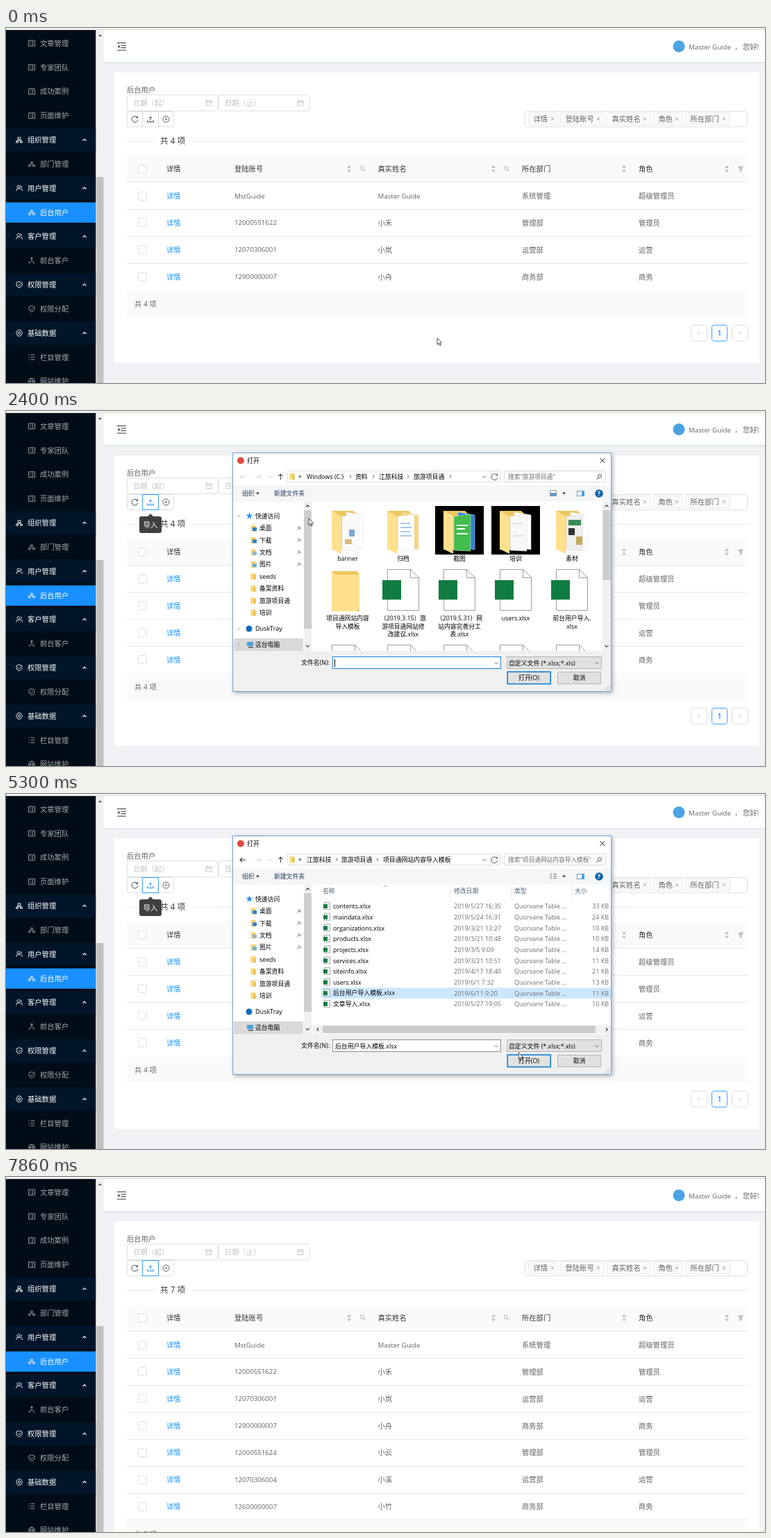
An HTML page that plays this animation: 1093 px wide and 512 px high, repeating every 7.95 s.

```html
<!DOCTYPE html>
<html lang="zh-CN">
<head>
<meta charset="utf-8">
<title>后台用户</title>
<style>
html,body{margin:0;width:100%;height:100%;overflow:hidden}
svg{display:block;width:100%;height:100%;font-family:"Open Sans","Noto Sans CJK SC","Noto Sans CJK",sans-serif}
text{white-space:pre}
</style>
</head>
<body>
<svg id="stage" viewBox="0 0 1093 512"></svg>
<script>
const LOOP = 7950, BLUE = '#1890ff', GREEN = '#107c41', GREY = '#d9d9d9', SOFT = '#bfbfbf', DARK = '#333', BODY = '#626262';

// Drawing helpers; text is placed by its vertical centre.
const T = (x, y, s, size = 10.3, fill = BODY, extra = '') =>
  `<text x="${x}" y="${y + size * .37}" font-size="${size}" fill="${fill}" ${extra}>${s}</text>`;
const R = (x, y, w, h, fill, extra = '') =>
  `<rect x="${x}" y="${y}" width="${w}" height="${h}" fill="${fill}" ${extra}/>`;
const box = (x, y, w, h, stroke = GREY, fill = '#fff', r = 0) =>
  R(x + .5, y + .5, w - 1, h - 1, fill, `stroke="${stroke}" stroke-width=".85" rx="${r}"`);
const P = (d, stroke, width = 1, fill = 'none') =>
  `<path d="${d}" stroke="${stroke}" stroke-width="${width}" fill="${fill}"/>`;
const at = (x, y, s, id = '') => `<g ${id && `id="${id}"`} transform="translate(${x} ${y})">${s}</g>`;
const G = (id, s) => `<g id="${id}">${s}</g>`;
const icon = (x, y, d, color, width = .9) => at(x, y, P(d, color, width));
const dot = (x, y, r, fill, extra = '') => `<circle cx="${x}" cy="${y}" r="${r}" fill="${fill}" ${extra}/>`;
const MID = 'text-anchor="middle"', END = 'text-anchor="end"';

const ring = r => `M${-r} 0a${r} ${r} 0 1 1 ${2 * r} 0a${r} ${r} 0 1 1 ${-2 * r} 0z`;
const ICON = {
  page: 'M-4.5-4h9v8h-9zM-2.5-2h1M0-2h2.5M-2.5 0h1M0 0h2.5M-2.5 2h1M0 2h2.5',
  org: 'M-2-3.5h4v3h-4zM-4.5 2h3v2h-3zM1.5 2h3v2h-3zM0-.5V1M-3 2V.8H3V2',
  tree: 'M-1.3-3h2.6v2.5h-2.6zM-4.3 1h2.6v2.5h-2.6zM1.7 1h2.6v2.5h-2.6zM0-.5V1',
  user: 'M-1-4a2 2 0 1 1-.1 0zM-4.5 4Q-4 .3-1 .2Q1 .2 2 2M2-4Q4.5-2 2.4 0Q4.4 1 4.5 4',
  nodes: 'M0-4v3M0 0L-3.5 3M0 0L3.5 3M-1.3-3a1.3 1.3 0 1 1 2.6 0zM-4.5 3.5h2.4M2.1 3.5h2.4M-1 0h2',
  shield: 'M0-4.5L4-3V.5Q3.5 3 0 4.5Q-3.5 3-4 .5V-3zM-2 0L-.5 1.5 2-1.5',
  gear: 'M-2-4.2h4L4.5 0 2 4.2h-4L-4.5 0z' + ring(1.6),
  list: 'M-1.5-3.5h6M-1.5 0h6M-1.5 3.5h6M-4.5-3.5h1.2M-4.5 0h1.2M-4.5 3.5h1.2',
  globe: ring(4.5) + 'M-4.5 0h9M0-4.5Q-4 0 0 4.5Q4 0 0-4.5',
  reload: 'M3.6-2.4A4.4 4.4 0 1 0 4.3 1M4-4.5v2.4H1.6',
  upload: 'M0 2V-3.5M-2-1.6L0-3.6 2-1.6M-4.3 1.5V4h8.6V1.5',
  cancel: ring(4.5) + 'M-1.6-1.6L1.6 1.6M1.6-1.6L-1.6 1.6',
  date: 'M-4-3h8v7h-8zM-4-.6h8M-2-4.4v2M2-4.4v2',
  search: 'M1 1L4 4M-3.5-1a2.5 2.5 0 1 1 5 0a2.5 2.5 0 1 1-5 0z',
  cross: 'M-2.3-2.3L2.3 2.3M2.3-2.3L-2.3 2.3',
  up: 'M-2.5 1.3L0-1.2 2.5 1.3', down: 'M-2.5-1.2L0 1.3 2.5-1.2',
  left: 'M1.2-2.2L-1.2 0 1.2 2.2', right: 'M-1.2-2.2L1.2 0-1.2 2.2',
  back: 'M4 0H-4M-.8-3L-4 0-.8 3', next: 'M-4 0H4M.8-3L4 0 .8 3', rise: 'M0 4V-4M-3-.8L0-4 3-.8'
};

function sidebar() {
  const items = [['page', '文章管理'], ['page', '专家团队'], ['page', '成功案例'], ['page', '页面维护'],
    ['org', '组织管理', 1], ['tree', '部门管理'], ['user', '用户管理', 1], ['tree', '后台用户'],
    ['user', '客户管理', 1], ['nodes', '前台客户'], ['shield', '权限管理', 1], ['shield', '权限分配'],
    ['gear', '基础数据', 1], ['list', '栏目管理'], ['globe', '网站维护']];
  return R(0, 3, 129.5, 509, '#000c17') + items.map(([name, label, parent], i) => {
    const y = 22 + i * 34.83, active = i === 7, color = parent || active ? '#fff' : '#a6a9ad';
    return (parent ? R(0, y - 17, 129.5, 34, '#001529') + icon(113, y, ICON.up, '#fff', 1.2) : '') +
      (active ? R(0, y - 14.3, 129.5, 29.3, BLUE) : '') +
      icon(parent ? 19 : 37, y, ICON[name], color) + T(parent ? 31 : 49, y, label, 10.3, color);
  }).join('') + R(129.5, 3, 11.5, 509, '#f1f1f1') + R(130.5, 215, 10, 297, '#c1c1c1') +
    P('M133 12l2.5-3 2.5 3z', 'none', 0, '#505050');
}

function page() {
  const tags = [[752, 44, '详情'], [798, 64, '登陆账号'], [865, 64, '真实姓名'], [932, 43, '角色'], [978, 65, '所在部门']];
  const dates = [[174, '日期（起）'], [306, '日期（止）']];
  return R(0, 0, 1093, 512, '#f0f2f5') + R(0, 0, 1093, 3, '#fff') + R(0, 1.5, 1093, 1.2, '#cfd5d3') + sidebar() +
    R(141, 3, 952, 46, '#fff') + R(141, 49, 952, 1, '#dde1e6') + R(141, 50, 952, 2, '#e8ebef') +
    P('M160 21.5h13M165.5 25h7.5M165.5 28.5h7.5M160 32h13', DARK, 1.1) + P('M163.5 24.5v4.5l-3-2.2z', 'none', 0, DARK) +
    dot(969, 26.5, 8.5, '#4ba3e3') + T(983, 27, 'Master Guide', 9.7) + T(1049, 27, '，') + T(1061, 27, '您好!') +
    R(156, 64, 929, 419, '#fff', 'id="card"') + T(174, 89, '后台用户') +
    dates.map(([x, s]) => box(x, 96, 131.5, 24, GREY, '#fff', 3) + T(x + 9, 108.5, s, 10.3, SOFT) + icon(x + 118, 108, ICON.date, SOFT)).join('') +
    box(174, 120, 68, 23, GREY, '#fff', 3) + P('M196.5 120v23M219.5 120v23', GREY) +
    G('reload', icon(185.5, 131.5, ICON.reload, '#444', 1)) +
    G('busy', R(174.5, 120.5, 22, 22, '#f5f5f5') + at(185.5, 131.5, P('M0-4.5A4.5 4.5 0 0 1 4.5 0', SOFT), 'arc')) +
    G('idle', icon(208, 131.5, ICON.upload, '#444', 1)) +
    G('hot', box(196, 120, 24, 23, BLUE) + icon(208, 131.5, ICON.upload, BLUE, 1)) +
    icon(230.5, 131.5, ICON.cancel, '#444') + box(747, 120, 321, 23, GREY, '#fff', 3) +
    tags.map(([x, w, s]) => box(x, 122, w, 18, '#e8e8e8', '#fafafa', 2) + T(x + 7.5, 131.5, s) + icon(x + w - 9, 131, ICON.cross, '#999', .8)).join('') +
    P('M174 163.5h41M267 163.5h801', '#e8e8e8');
}

function table(count) {
  const heads = [[231, '详情'], [329, '登陆账号'], [535.5, '真实姓名'], [743, '所在部门'], [911, '角色']];
  const people = [['MstGuide', 'Master Guide', '系统管理', '超级管理员'], ['12000551622', '小禾', '管理部', '管理员'],
    ['12070306001', '小岚', '运营部', '运营'], ['12900000007', '小舟', '商务部', '商务'], ['12000551624', '小云', '管理部', '管理员'],
    ['12070306004', '小溪', '运营部', '运营'], ['12600000007', '小竹', '商务部', '商务']];
  const check = y => box(190, Math.round(y - 6.5), 13, 13, GREY, '#fff', 2), total = `共 ${count} 项`;
  const end = Math.round(222.5 + count * 38.9);
  const rows = people.slice(0, count).map((cells, i) => {
    const y = 242 + i * 38.9;
    return check(y) + T(231, y, '详情', 10.3, BLUE) +
      cells.map((s, k) => T(heads[k + 1][0], y, s, /^\w/.test(s) ? 9.7 : 10.3)).join('') + R(174, Math.round(y + 19), 894, 1, '#e8e8e8');
  }).join('');
  const pager = [[986, ICON.left], [1045, ICON.right]].map(([x, d]) =>
    box(x, end + 50, 24, 24, GREY, '#fff', 3) + icon(x + 12, end + 62, d, SOFT)).join('') +
    box(1016, end + 50, 23, 24, BLUE, '#fff', 3) + T(1027.5, end + 62, '1', 10.3, BLUE, MID + ' font-weight="600"');
  return G('total' + count, T(222, 163, total, 11.7, DARK)) + G('table' + count, R(174, 184, 894, 38, '#fafafa') +
    R(174, 222, 894, 1, '#e8e8e8') + check(203) + heads.map(([x, s]) => T(x, 203, s, 10.3, DARK)).join('') +
    [494, 702, 890, 1038].map(x => P(`M${x - 3} 202l3-4 3 4zM${x - 3} 204.5l3 4 3-4z`, 'none', 0, SOFT)).join('') +
    [514, 721].map(x => icon(x, 203, ICON.search, '#aaa')).join('') + P('M1054 199.5h8l-2.5 4.5v3.5h-3v-3.5z', 'none', 0, SOFT) +
    rows + R(174, end, 894, 39, '#fafafa') + T(185, end + 20, total) + pager);
}

const miniFolder = (x, y) => R(x - 3.5, y - 4.5, 7, 9, '#f8d775') + R(x + 1, y - 2, 2.5, 6.5, '#e6b94d');
const plainFolder = (x, y) => at(x, y, P('M-22 3h35l4 4v54h-39z', 'none', 0, '#edc65e') + P('M-23 3l6 5h34v50l-5 3h-35z', 'none', 0, '#ffe08f'));
function folder(x, y, back, front, marks = '', backdrop) {
  return at(x, y, (backdrop ? R(-35, 0, 70, 70, backdrop) : '') + P('M-23 7h31l4 4v52h-35z', 'none', 0, '#edc65e') +
    P('M-2 9l24 4v50l-24-4z', '#ddd', .5, back) + P('M-8 15l24-3v53l-24-1z', '#ddd', .5, front) + marks +
    P('M-23 7l14 8v54l-14-7z', 'none', 0, '#ffe08f'));
}
const sheet = (x, y) => at(x, y, P('M-22.5.5h33l12 12v47h-45z', '#8c8c8c', .85, '#fff') + P('M10.5.5v12h12', '#8c8c8c', .85) + R(-30, 16, 27, 28, GREEN));

function grid() {
  const xs = [492, 572, 653, 734, 815];
  const label = (x, y, s) => s.split('/').map((line, i) => T(x, y + i * 11.6, line, 8.8, '#000', MID)).join('');
  const top = ['banner', '归档', '截图', '培训', '素材'];
  const second = ['项目通网站内容/导入模板', '（2019.3.15）旅/游项目通网站修/改建议.xlsx', '（2019.5.31）网/站内容完善分工/表.xlsx', 'users.xlsx', '前台用户导入./xlsx'];
  const third = ['网站各栏目标/题、关键词及描/述.xlsx', '项目通功能列表/及完成情况(修/改）.xlsx', '项目通功能列表/及完成情况.xlsx', '项目通前端页面./xlsx', '项目推进时间表./xlsx'];
  const lines = c => P('M-4 25h14M-4 31h16M-4 37h14M-4 43h16', c, 1);
  return folder(492, 137, '#fff', '#fafafa', R(2, 34, 8, 10, '#7fa6d8') + R(-4, 48, 10, 7, '#d9ba78')) +
    folder(572, 137, '#f6d678', '#fff', lines('#4a90d9')) +
    folder(653, 137, '#2f80d8', '#43bd4c', P('M-4 28h16M-4 33h12M-4 40h16', '#fff', 2), '#000') +
    folder(734, 137, '#fff', '#f8f8f8', P('M-4 25h14M-4 43h16', '#ccc'), '#000') +
    folder(815, 137, '#fff', '#eee', R(-5, 20, 18, 8, '#3a8a55') + R(-5, 32, 9, 10, '#333') + R(6, 44, 9, 12, '#c5a760')) +
    top.map((s, i) => label(xs[i], 213, s)).join('') +
    G('picked', box(454, 222, 76, 97, '#99d1ff', '#cce8ff')) + G('closed', plainFolder(492, 228)) +
    G('filled', folder(492, 228, '#fff', '#fff', R(-6, 28, 9, 16, GREEN) + R(7, 28, 5, 16, GREEN))) +
    second.map((s, i) => (i ? sheet(xs[i], 228) : '') + label(xs[i], 299, s)).join('') +
    third.map((s, i) => sheet(xs[i], 337) + label(xs[i], 408, s)).join('');
}

const ROW = 15.65, LIST_TOP = 154.2;
function list() {
  const files = [['contents', '5/27 16:35', 33], ['maindata', '5/24 16:31', 24], ['organizations', '3/21 13:27', 10],
    ['products', '3/21 10:48', 10], ['projects', '3/5 9:09', 14], ['services', '3/21 10:51', 11], ['siteinfo', '4/17 18:40', 21],
    ['users', '6/1 7:32', 13], ['后台用户导入模板', '6/11 9:20', 11], ['文章导入', '5/27 19:05', 10]];
  const ys = files.map((_, i) => 162 + i * ROW), soft = '#6d6d6d';
  return R(442, 131, 429, 215, '#fff') + [[456, '名称'], [645, '修改日期'], [732, '类型'], [819, '大小']].map(([x, s]) => T(x, 140, s, 8.8, '#4c607a')).join('') +
    P('M640.5 131v19M728.5 131v19M815.5 131v19', '#e5e5e5') + icon(546, 133, ICON.up, '#888', .8) +
    R(454, 0, 417, ROW, '#e5f3ff', 'id="hover"') + R(454, LIST_TOP + 8 * ROW, 417, ROW, '#cce8ff', 'id="chosen"') +
    G('icons', ys.map(y => box(458, y - 6, 9, 11, '#999') + R(457, y - 3, 6, 6, GREEN)).join('')) +
    files.map(([name, date, size], i) => T(471, ys[i], name + '.xlsx', 8.9, '#000') + T(645, ys[i], '2019/' + date, 9, soft) +
      T(732, ys[i], 'Quorvane Table ...', 9, soft) + T(868, ys[i], size + ' KB', 9, soft, END)).join('') +
    R(443, 334, 428, 11, '#f0f0f0') + R(456, 334, 393, 11, '#cdcdcd') +
    icon(449, 339.5, ICON.left, DARK, 1.1) + icon(865, 339.5, ICON.right, DARK, 1.1);
}

function dialog() {
  const crumbs = (parts, seps, query) => parts.map(([x, s]) => T(x, 94.5, s, 8.9, '#000')).join('') +
    seps.map(x => icon(x, 94.5, ICON.right, '#444')).join('') + T(723, 95, `搜索"${query}"`, 8.7, '#6d6d6d');
  const places = ['桌面', '下载', '文档', '图片', 'seeds', '备案资料', '旅游项目通', '培训'];
  const vbar = (x, w) => R(x, 131, w, 215, '#f0f0f0') + icon(x + w / 2, 137, ICON.up, DARK, 1.1) + icon(x + w / 2, 339, ICON.down, DARK, 1.1);
  return R(326.5, 60.5, 545, 344, '#fff', 'style="filter:drop-shadow(2px 2px 3px #0005)"') +
    dot(338, 71.5, 5, '#e04a3f') + T(347, 71.5, '打开', 9, '#000') + icon(859, 71.5, 'M-3.5-3.5L3.5 3.5M3.5-3.5L-3.5 3.5', '#000') +
    G('backOff', icon(341, 95, ICON.back, '#ccc')) + G('backOn', icon(341, 95, ICON.back, '#333', 1.1)) +
    icon(363, 95, ICON.next, '#ccc') + icon(380, 95, ICON.down, '#bbb') + icon(395.5, 95, ICON.rise, '#444', 1.1) +
    box(405, 86, 307, 17, GREY) + miniFolder(412, 94.5) + T(421, 93.5, '«', 9, '#000') +
    G('pathOut', crumbs([[433, 'Windows (C:)'], [503, '资料'], [537, '江旅科技'], [587, '旅游项目通']], [496, 529, 579, 640], '旅游项目通')) +
    G('pathIn', crumbs([[433, '江旅科技'], [483, '旅游项目通'], [543, '项目通网站内容导入模板']], [476, 535], '项目通网站内容导入模板')) +
    icon(689, 95, ICON.down, '#555') + R(697, 87, 1, 15, '#ddd') + icon(703.5, 95, ICON.reload, '#555', 1) +
    P('M717.5 86.5h146v16h-146z', GREY) + at(854, 95, `<g transform="scale(-1 1)">${P(ICON.search, '#555', 1)}</g>`) +
    R(327, 107, 544, 24, '#f5f6f7') + T(340, 119, '组织', 8.8, '#1e395b') + T(386, 119, '新建文件夹', 8.8, '#1e395b') +
    P('M360 117.5h5l-2.5 3zM801 117.5h5l-2.5 3z', 'none', 0, DARK) +
    G('viewIcons', box(783, 114, 10, 9, '#888') + R(784, 118, 8, 4, '#5b9bd5')) +
    G('viewList', P('M783 115.5h3M783 118.5h3M783 121.5h3M788 115.5h5M788 118.5h5M788 121.5h5', '#777')) +
    box(822, 115, 11, 8, '#5a8fc4') + R(829, 115, 4, 8, '#4aa0e8') + dot(854, 119, 5.8, '#0a64ad') + T(854, 119, '?', 9, '#fff', MID + ' font-weight="700"') +
    R(327, 131, 102, 215, '#fff') + R(328, 328, 100, 18, '#d9d9d9') +
    T(345, 151, '★', 11, '#2f8fe0') + T(359, 151.5, '快速访问', 8.8, '#000') +
    places.map((s, i) => {
      const y = 169 + i * 17.4;
      return miniFolder(356, y) + (i < 4 ? R(355, y - 1, 6, 5, ['#2684d8', '#2684d8', '#8fb4d6', '#62b5d8'][i]) +
        at(422, y, P('M-3 3L0 0M-1.5-2L2 1.5M0-3L3 0L1 1L-1-1z', '#888', .9)) : '') + T(365, y, s, 8.8, '#000');
    }).join('') + dot(350, 314, 4.5, '#0f6cbd') + T(359, 314, 'DuskTray', 9, '#000') +
    R(347, 333, 9, 6, '#4a9fdc') + R(349, 340, 7, 1.5, '#555') + T(359, 337, '这台电脑', 8.8, '#000') +
    G('twisties', icon(335, 151, ICON.down, '#888') + icon(335, 314, ICON.right, '#aaa') + icon(335, 337, ICON.right, '#aaa')) +
    vbar(429, 11) + R(429, 143, 11, 171, '#cdcdcd') +
    G('gridView', `<g clip-path="url(#pane)">${G('files', grid())}</g>` + vbar(859, 12) + R(859.5, 143, 11, 101, '#cdcdcd', 'id="thumb"')) + G('listView', list()) +
    R(327, 346, 544, 58, '#f0f0f0') + T(466, 363, '文件名(N):', 8.9, '#000', END) + box(470, 354, 243, 18, '#7a7a7a') +
    G('focus', box(470, 354, 243, 18, '#0078d7') + R(473, 358, 1, 11, '#000')) +
    G('entry', T(474, 363.5, '后台用户导入模板.xlsx', 8.9, '#000')) + icon(706, 363.5, ICON.down, '#555') +
    box(721, 354, 137, 18, '#adadad', '#e1e1e1') + T(724, 363.5, '自定义文件 (*.xlsx;*.xls)', 8.9, '#000') + icon(851, 363.5, ICON.down, '#555') +
    R(722.2, 376.2, 62, 17.4, '#e1e1e1', 'stroke="#0078d7" stroke-width="1.5"') + T(753, 385, '打开(O)', 8.9, '#000', MID) +
    box(794, 376, 63, 18, '#adadad', '#e1e1e1') + T(825.5, 385, '取消', 8.9, '#000', MID) +
    P('M862 402.5l7-7M865 402.5l4-4M868 402.5l1-1', '#bbb') + P('M326.5 60.5h545v344h-545z', '#5b97cf', .85);
}

const stage = document.getElementById('stage');
stage.innerHTML = '<clipPath id="pane">' + R(442, 131, 417, 215, '#000') + '</clipPath>' + page() + table(4) + table(7) +
  at(621, 323.5, [1, .7, .85, .6].map((o, i) => dot(...[[0, -6], [6, 0], [0, 6], [-6, 0]][i], 2.8, BLUE, `opacity="${o}"`)).join(''), 'spinner') +
  G('tip', P('M204 152l4-4 4 4z', 'none', 0, '#404040') + R(192, 152, 32, 24, '#404040', 'rx="3"') + T(208, 164, '导入', 10.3, '#fff', MID)) +
  G('dialog', dialog()) +
  G('cursor', dot(1, 0, 8, '#fff02a', 'id="glow" opacity=".65"') +
    G('arrow', P('M0 0V9.5L2.2 7.5 3.8 11 5.2 10.4 3.7 7H6.5z', '#222', .8, '#fff')) +
    G('hand', P('M-1 1Q0-.6 1 1V5L6 6.2Q7 6.5 6.8 8L6 12.5H0L-3.5 8.5Q-3.8 6.8-2.5 7.2L-1 8z', '#111', .9, '#fff')));

const el = {};
stage.querySelectorAll('[id]').forEach(n => el[n.id] = n);
const show = (id, on) => el[id].style.display = on ? '' : 'none';
const move = (id, s) => el[id].setAttribute('transform', s);
const ramp = (t, a, b) => Math.min(1, Math.max(0, (t - a) / (b - a)));
const ease = (t, a, b) => { const k = ramp(t, a, b); return k * k * (3 - 2 * k); };

// Pointer stops: time, x, y
const stops = [[0, 621, 447], [109, 621, 447], [110, 613, 447], [230, 613, 447], [1050, 212, 137], [1150, 210, 131], [1620, 210, 131],
  [1880, 230, 30], [1920, 230, 30], [2220, 536, 71], [2390, 436, 155], [2500, 436, 155], [2760, 490, 190], [3080, 497, 200],
  [3760, 497, 200], [4250, 516, 299], [4440, 516, 299], [4580, 516, 288], [4860, 516, 288], [5420, 768, 384], [6580, 768, 384],
  [7300, 1041, 493], [7420, 1048, 501], [7540, 1056, 512]];
function pointer(t) {
  const i = stops.findIndex(s => s[0] > t);
  if (i < 0) return [1056, 520];
  const [a, x, y] = stops[i - 1], [b, u, v] = stops[i], k = ease(t, a, b);
  return [x + (u - x) * k, y + (v - y) * k];
}

function draw(t) {
  const [x, y] = pointer(t), inside = t >= 3260, done = t >= 6250, loading = t >= 5610 && !done;
  const row = Math.floor((y - LIST_TOP) / ROW);
  move('cursor', `translate(${x} ${y})`);
  show('cursor', t < 7540);
  const hand = t >= 1110 && t < 1640;
  show('hand', hand);
  show('arrow', !hand);
  show('glow', [[3130, 3260], [4820, 4900], [5470, 5550]].some(([a, b]) => t >= a && t < b));

  show('hot', t >= 1110);
  show('idle', t < 1110);
  el.tip.style.opacity = ramp(t, 1100, 1270) * (1 - ramp(t, 5580, 5700));

  for (const n of [4, 7]) {
    const on = done === (n === 7);
    show('total' + n, on);
    show('table' + n, on);
    el['table' + n].style.opacity = loading ? 1 - .5 * ramp(t, 5700, 6000) : 1;
  }
  el.card.setAttribute('height', done ? 536 : 419);
  show('reload', !loading);
  show('busy', loading);
  move('arc', `translate(185.5 131.5) rotate(${t * .36})`);
  show('spinner', loading);
  el.spinner.style.opacity = .3 + .7 * ramp(t, 5740, 6000);
  move('spinner', `translate(621 323.5) rotate(${10 + (t - 5760) * .3})`);

  show('dialog', t >= 1680 && t < 5610);
  el.dialog.style.opacity = 1 - ramp(t, 5540, 5610);
  const drag = 1 - ease(t, 1920, 2220);
  move('dialog', `translate(${-306 * drag} ${-41 * drag})`);
  const scroll = ease(t, 2740, 2920);
  move('files', `translate(0 ${-91 * scroll})`);
  move('thumb', `translate(0 ${48 * scroll})`);
  show('twisties', t >= 2300 && t < 2620);
  show('picked', t >= 3000);
  show('closed', t < 2840);
  show('filled', t >= 2840);
  for (const id of ['gridView', 'pathOut', 'backOff', 'viewIcons', 'focus']) show(id, !inside);
  for (const id of ['listView', 'pathIn', 'backOn', 'viewList']) show(id, inside);
  show('icons', t >= 3350);
  show('hover', row >= 0 && row < 10);
  el.hover.setAttribute('y', LIST_TOP + row * ROW);
  show('chosen', t >= 4820);
  show('entry', t >= 4820);
}

let start;
function frame(now) {
  start ??= now;
  draw((now - start) % LOOP);
  requestAnimationFrame(frame);
}
draw(0);
requestAnimationFrame(frame);
</script>
</body>
</html>
```
